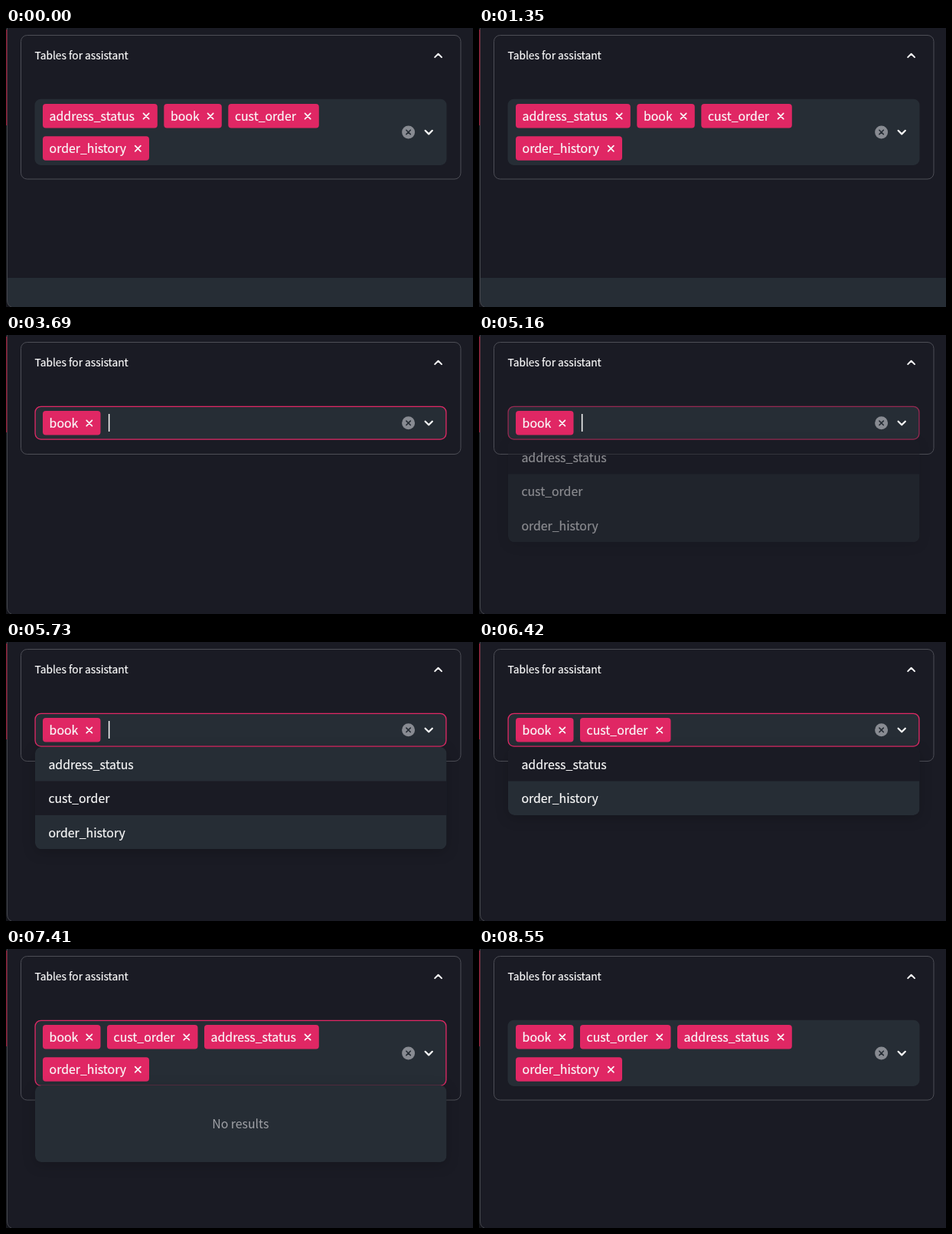
Animation of 610x364 px, one loop 9.57 s. Source, as an HTML page:

```html
<!DOCTYPE html>
<html lang="en">
<head>
<meta charset="utf-8">
<title>Table picker</title>
<style>
  html, body { margin: 0; width: 100%; height: 100%; overflow: hidden; background: #1a1b24; }
  svg { display: block; width: 610px; height: 364px; }
  text { font: 15.85px "Noto Sans CJK JP", "Noto Sans CJK SC", "Noto Sans CJK", "Noto Sans", sans-serif;
         fill: #fafafa; stroke: #fafafa; stroke-width: .2px; white-space: pre; }
  .title { font-size: 13.75px; }
  .muted { fill: #a0a2a7; stroke: none; }
  .line { fill: none; stroke: #fafafa; stroke-width: 2; stroke-linecap: round; stroke-linejoin: round; }
  .menu { filter: drop-shadow(0 4px 8px rgba(0, 0, 0, .18)); }
</style>
</head>
<body>
<svg id="stage" viewBox="0 0 610 364"></svg>
<script>
const LOOP = 9570, BG = '#1a1b24', FIELD = '#262d35', PINK = '#e02764';
const ROW = 44.4, TAG_GAP = 8.5, LEFT = 48, WRAP = 505;
const A = 'address_status', B = 'book', C = 'cust_order', H = 'order_history';
const tagWidth = { [A]: 149.8, [B]: 75.5, [C]: 118.5, [H]: 139 };

// [start time, selected tags, unselected options]
const selections = [
  [0, [A, B, C, H], []],
  [1860, [B, C, H], [A]],
  [2910, [B, H], [A, C]],
  [3690, [B], [A, C, H]],
  [5940, [B, C], [A, H]],
  [6540, [B, C, A], [H]],
  [7260, [B, C, A, H], []],
];
// [start time, highlighted row]
const highlights = [[0, 0], [5640, 1], [6240, 0]];
const caretOn = [[1860, 2370], [2910, 3450], [3690, 4200], [4710, 5220], [5730, 5940]];

const ramp = (t, a, b) => Math.min(1, Math.max(0, (t - a) / (b - a)));
const latest = (list, t) => list.filter(e => e[0] <= t).pop();
const within = (t, [a, b]) => t >= a && t < b;

const rect = (x, y, w, h, r, attrs) =>
  `<rect x="${x}" y="${y}" width="${w}" height="${h}" rx="${r}" ${attrs}/>`;
const text = (x, y, s, attrs = '') => `<text x="${x}" y="${y}" ${attrs}>${s}</text>`;
const line = (d, attrs = '') => `<path class="line" d="${d}" ${attrs}/>`;
const cross = (x, y, r, attrs) =>
  line(`M${x - r} ${y - r}l${2 * r} ${2 * r}m0 ${-2 * r}l${-2 * r} ${2 * r}`, attrs);

function placeTags(names) {
  let x = LEFT, row = 0;
  return names.map(name => {
    const w = tagWidth[name];
    if (x + w > WRAP) { x = LEFT; row++; }
    const tag = { name, x, w, row };
    x += w + TAG_GAP;
    return tag;
  });
}

function drawTag({ name, x, w, row }) {
  const y = 99 + row * 42.2;
  return rect(x, y, w, 31.6, 4, `fill="${PINK}"`) +
    text(x + 8.6, y + 22, name) +
    cross(x + w - 14.7, y + 16, 3.6, 'style="stroke-width:1.7"');
}

function drawMenu(top, options, active, opacity) {
  const h = options.length ? options.length * ROW : 100;
  const rows = options.map((name, i) =>
    (i === active ? rect(38, top + i * ROW, 537.5, ROW, 0, `fill="${BG}"`) : '') +
    text(55.4, top + 28.7 + i * ROW, name)).join('');
  const empty = text(306.3, top + 56, 'No results', 'class="muted" text-anchor="middle"');
  return `<clipPath id="menuClip">${rect(38, top, 537.5, h, 8, '')}</clipPath>
    <g class="menu" opacity="${opacity}"><g clip-path="url(#menuClip)">
    ${rect(38, top, 537.5, h, 8, `fill="${FIELD}"`)}${options.length ? rows : empty}</g></g>`;
}

function draw(t) {
  const [, selected, options] = latest(selections, t);
  const tags = placeTags(selected), last = tags[tags.length - 1];
  const extra = last.row * 42.2, bottom = 136.7 + extra, mid = 114.8 + extra / 2;
  const dip = Math.sin(Math.PI * ramp(t, 5040, 5280)) * .4;
  const closing = ramp(t, 8460, 8550);
  const focus = ramp(t, 1830, 2040) * (1 - closing) * (1 - dip);
  const menuOpacity = ramp(t, 5040, 5280) * (1 - closing);
  const clearColor = within(t, [4500, 4830]) ? '#fafafa' : '#888b92';

  return rect(0, 0, 610, 364, 0, `fill="${BG}"`) +
    (t < 1950 ? rect(2, 326, 608, 38, 0, `fill="${FIELD}"`) : '') +
    // window edge
    '<path d="M0 0H1.5V355Q1.5 362 7 364H0Z" fill="#14151b"/>' +
    '<path d="M1.5 0V355Q1.5 362 7 364" fill="none" stroke="#45474d"/>' +
    rect(0, 2, 1.4, 125, 0, 'fill="#8c1c35"') +
    // panel
    rect(19.5, 9.5, 574.5, 146 + extra * .985, 8, 'fill="none" stroke="#4d4e56"') +
    text(37.6, 41.2, 'Tables for assistant', 'class="title"') +
    line('M560.2 38.1l4.4-4.4l4.4 4.4') +
    // field
    rect(37.5, 92.7, 538, bottom - 92.7, 8, `fill="${FIELD}"`) +
    rect(38.1, 93.3, 536.8, bottom - 93.9, 7.5,
      `fill="none" stroke="${PINK}" stroke-width="1.3" opacity="${focus}"`) +
    tags.map(drawTag).join('') +
    (caretOn.some(span => within(t, span))
      ? rect(last.x + last.w + 10.4, 103, 1.5, 23, 0, 'fill="#fafafa"') : '') +
    `<circle cx="525.6" cy="${mid}" r="8.5" fill="${clearColor}"/>` +
    cross(525.6, mid, 2.7, `style="stroke:${FIELD};stroke-width:1.6"`) +
    line(`M547.6 ${mid - 2.1}l4.6 4.6l4.6-4.6`, 'style="stroke-width:2.2"') +
    (menuOpacity > 0
      ? drawMenu(bottom + (last.row ? -.9 : .4), options, latest(highlights, t)[1], menuOpacity) : '');
}

const stage = document.getElementById('stage'), start = performance.now();
let shown = '';
function tick() {
  const picture = draw((performance.now() - start) % LOOP);
  if (picture !== shown) stage.innerHTML = shown = picture;
  requestAnimationFrame(tick);
}
tick();
</script>
</body>
</html>
```
